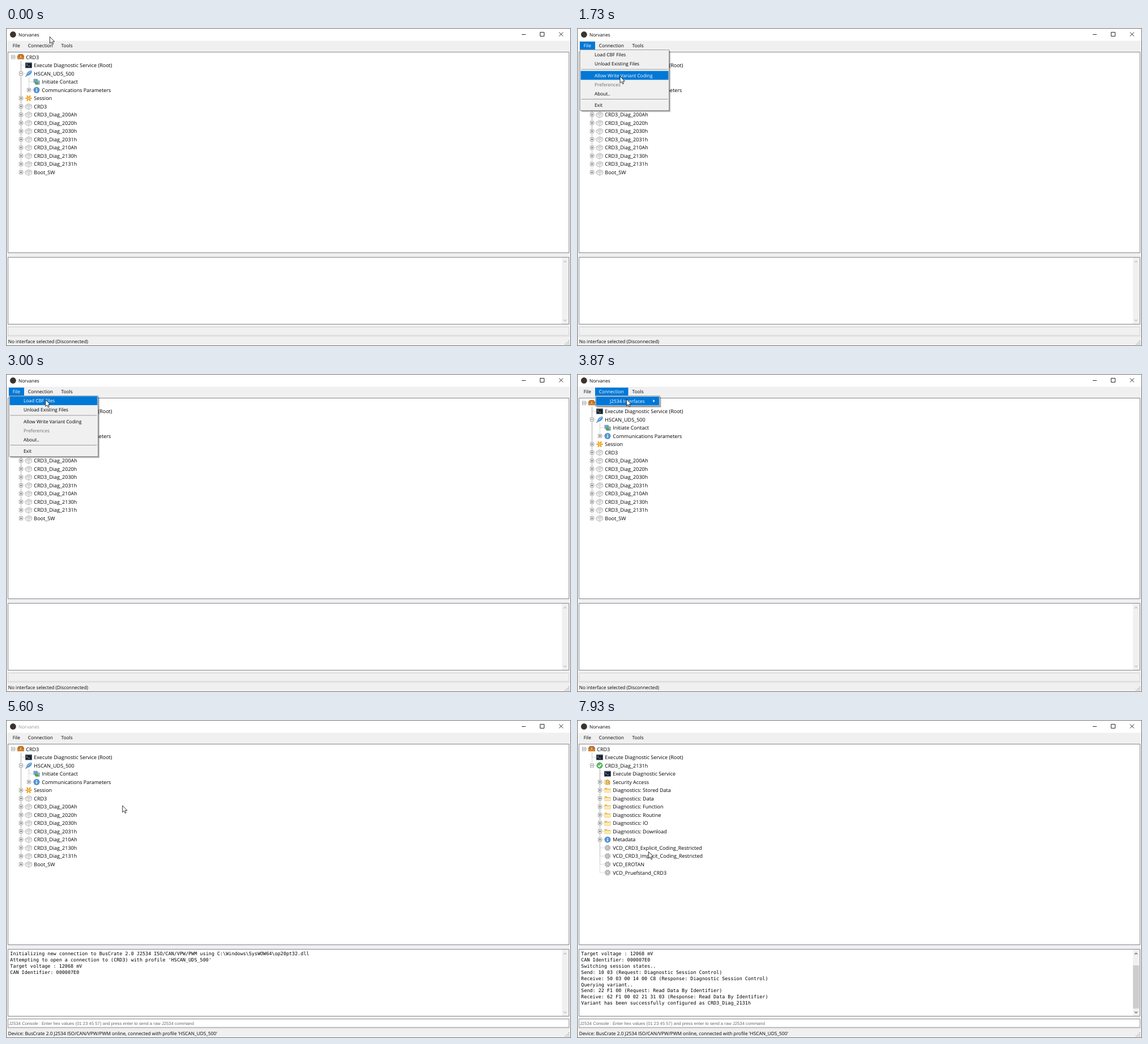
Write an HTML page that moves like this. It is 998x561 px and loops after 8000 ms.

```html
<!DOCTYPE html>
<html lang="en">
<head>
<meta charset="utf-8">
<title>Diagnostics</title>
<style>
  html, body { margin: 0; width: 100%; height: 100%; overflow: hidden; background: #f0f0f0; }
  svg { display: block; width: 998px; height: 561px; text-rendering: geometricPrecision; }
  text { font: 8.3px "Open Sans", "Noto Sans", sans-serif; fill: #000; white-space: pre; }
  text.tree { font-size: 9px; }
  text.log { font: 8.45px "DejaVu Sans Mono", monospace; }
  text.hint { font: 7.72px "Liberation Sans", sans-serif; fill: #6d6d6d; }
  text.off { fill: #6d6d6d; }
  .sel { fill: #0078d7; visibility: hidden; }
  .on > .sel { visibility: visible; }
  .on > text:not(.off) { fill: #fff; }
  .on > .arrow { fill: #fff; }
</style>
</head>
<body>
<svg id="stage" viewBox="0 0 998 561">
  <defs>
    <g id="chest"><path d="M-6-2l2-3H4l2 3v6H-6z" fill="#cf8136"/><path d="M-6-1.5H6M-3.5-4.5H3.5" stroke="#965419" stroke-width=".9"/><path d="M-1-2h2v2.500h-2z" fill="#f4d27a"/></g>
    <g id="term"><path d="M-6-5H6V5H-6z" fill="#5c6b7a"/><path d="M-5.300-3.500H5.300V4.300H-5.300z" fill="#17222d"/><path d="M-4-2l2 1.500-2 1.500M-1 1.500h3" fill="none" stroke="#dfe8ee" stroke-width=".7"/></g>
    <g id="plug"><path d="M-5.500 5.500l3-3" stroke="#5d7894" stroke-width="1.500"/><path d="M-4 2Q-3-3 3-5l2.500 0V-2Q3 3-2 4z" fill="#4c93d4"/><path d="M-2 1L4-4" stroke="#a8d1f2" stroke-width="1.200"/></g>
    <g id="contact"><path d="M-5.500-5H2V2H-5.500z" fill="#8b9aa6"/><path d="M-4.500-4H1V1H-4.500z" fill="#69a8df"/><path d="M-2-2H5.500V5H-2z" fill="#718491"/><path d="M-1-1H4.500V4H-1z" fill="#8ec5f0"/><path d="M-3 1h3V-1l4 3.500-4 3V4h-3z" fill="#49a83d"/></g>
    <g id="info"><circle r="5.400" fill="#3d7fc1"/><circle r="4.400" fill="#5b9ad6"/><path d="M0-3v1.500M0-.5V3" stroke="#fff" stroke-width="1.500"/></g>
    <g id="star"><path d="M-5.500 0H5.500M-3-4.700L3 4.700M3-4.700L-3 4.700" stroke="#f0a024" stroke-width="2.400"/><circle r="1.500" fill="#fbd27c"/></g>
    <g id="cube"><path d="M-5.500-2L0-5 5.500-2.500V2.500L0 5.500-5.500 3z" fill="#ececec" stroke="#a6a6a6" stroke-width=".7"/><path d="M-5.500-2L0 .5 5.500-2.500M0 .5V5.500M-2.700-3.500L3-1M2.700-3.700L-2.700-.8" fill="none" stroke="#b4b4b4" stroke-width=".6"/></g>
    <g id="check"><circle r="5.400" fill="#3fa648"/><circle r="4.300" fill="#5fc066"/><path d="M-2.500 0L-.6 2 2.700-2" fill="none" stroke="#fff" stroke-width="1.500"/></g>
    <g id="folder"><path d="M-5.500-4h4l1 1.500h6v7h-11z" fill="#e9bb58"/><path d="M-5-1H5V4H-5z" fill="#fdeab2"/></g>
    <g id="lock"><path d="M-5.500-4h4l1 1.500h5.500v7h-11z" fill="#f3d68b"/><path d="M-2 0V-2Q0-5 2.500-2V0" fill="none" stroke="#888" stroke-width="1.200"/><path d="M-3 0H4V5H-3z" fill="#e3a62f"/><path d="M-2 1l4 3" stroke="#fff3c8"/></g>
    <g id="gear"><circle r="4.300" fill="#c2c2c2" stroke="#aaa" stroke-width="2" stroke-dasharray="2 1.380"/><circle r="1.500" fill="#f4f4f4" stroke="#999" stroke-width=".6"/></g>
  </defs>

  <path d="M0 0H998V561H0z" fill="#f0f0f0"/>
  <path d="M0 0H998V22.500H0z" fill="#fff"/>
  <circle cx="12.400" cy="11.500" r="5.400" fill="#3b342e"/>
  <text id="caption" x="22" y="14.600" style="font-size:8.200px">Norvanes</text>
  <path d="M911 11.500h7M943.500 7.500h7v7h-7zM977 7.500l7 7M984 7.500l-7 7" fill="none" stroke="#111" stroke-width=".9"/>

  <g fill="#fff" stroke="#828790">
    <path d="M3.500 42.500H994.500V396.500H3.500zM3.500 404.500H994.500V522.500H3.500z"/>
    <path id="input" d="M3.500 527.500H994.500V542.300H3.500z" stroke-width=".8"/>
  </g>
  <path d="M982 405H994V522H982z" fill="#f0f0f0"/>
  <path id="thumb" d="M982 433H993V509H982z" fill="#cdcdcd"/>
  <path id="arrows" d="M985 413.500l2.500-2.500 2.500 2.500M985 514.500l2.500 2.500 2.500-2.500" fill="none" stroke-width="1.100"/>
  <text id="hint" class="hint" x="5" y="537.700">J2534 Console : Enter hex values (01 23 45 57) and press enter to send a raw J2534 command</text>
  <path d="M1 543.900H997" stroke="#d9d9d9" stroke-width=".8"/>
  <text id="status" x="3.700" y="556"></text>
  <path d="M994 551v8M991 554v5M988 557v2" stroke="#a5a5a5" stroke-width="1.600" stroke-dasharray="1.600 1.400"/>
  <path d="M.5.500H997.500V560.500H.5z" fill="none" stroke="#707070"/>

  <g id="content"></g>
  <path id="pointer" d="M0 0V11.800L2.700 9.300 4.600 13.500 6.500 12.700 4.700 8.600H8.300z" fill="#fff" stroke="#000" stroke-width=".8"/>
</svg>
<script>
const LOOP = 8000, DEVICE = 'BusCrate 2.0 J2534 ISO/CAN/VPW/PWM', PROFILE = "'HSCAN_UDS_500'";
const $ = id => document.getElementById(id);

function add(parent, tag, attrs = {}, label) {
  const el = document.createElementNS('http://www.w3.org/2000/svg', tag);
  for (const key in attrs) el.setAttribute(key, attrs[key]);
  if (label) el.textContent = label;
  return parent.appendChild(el);
}
const box = (parent, x, y, width, height, attrs) => add(parent, 'rect', { x, y, width, height, ...attrs });
const show = (el, visible) => { el.style.display = visible ? '' : 'none'; };
const content = $('content');

// Tree rows: level, expander, icon, label
function buildTree(rows) {
  const g = add(content, 'g'), parents = [];
  const places = rows.map(([level], i) => ({ x: 12.5 + 14 * level, y: 51.2 + 14.53 * i }));
  rows.forEach(([level], i) => {
    const { x, y } = places[i];
    parents[level] = y;
    const stem = level ? `M${x} ${parents[level - 1] + 7}V${y}` : '';
    add(g, 'path', { d: `${stem}M${x} ${y}h8`, fill: 'none', stroke: '#a6a6a6', 'stroke-width': .8, 'stroke-dasharray': '1 1' });
  });
  g.rows = rows.map(([, sign, icon, label], i) => {
    const { x, y } = places[i], row = add(g, 'g');
    if (sign) {
      box(row, x - 3, y - 3, 6, 6, { fill: '#fff', stroke: '#919191', 'stroke-width': .8 });
      add(row, 'path', { d: `M${x - 1.8} ${y}h3.600` + (sign === '+' ? `M${x} ${y - 1.8}v3.600` : ''), stroke: '#333', 'stroke-width': .8 });
    }
    add(row, 'use', { href: '#' + icon, x: x + 13.5, y });
    const mark = box(row, x + 21.5, y - 7.2, 0, 14.4, { class: 'sel' });
    const text = add(row, 'text', { class: 'tree', x: x + 22.8, y: y + 3.4 }, label);
    mark.setAttribute('width', text.getComputedTextLength() + 3);
    return row;
  });
  return g;
}

const modules = ['CRD3', ...['200A', '2020', '2030', '2031', '210A', '2130', '2131'].map(n => `CRD3_Diag_${n}h`), 'Boot_SW'];
const rootRow = [0, '-', 'chest', 'CRD3'];
const serviceRow = [1, '', 'term', 'Execute Diagnostic Service (Root)'];
const baseTree = buildTree([
  rootRow, serviceRow,
  [1, '-', 'plug', 'HSCAN_UDS_500'],
  [2, '', 'contact', 'Initiate Contact'],
  [2, '+', 'info', 'Communications Parameters'],
  [1, '+', 'star', 'Session'],
  ...modules.map(name => [1, '+', 'cube', name])
]);
const closedTree = buildTree([[0, '+', 'chest', 'CRD3']]);
closedTree.rows[0].classList.add('on');
const variantTree = buildTree([
  rootRow, serviceRow,
  [1, '-', 'check', 'CRD3_Diag_2131h'],
  [2, '', 'term', 'Execute Diagnostic Service'],
  [2, '+', 'lock', 'Security Access'],
  ...['Stored Data', 'Data', 'Function', 'Routine', 'IO', 'Download'].map(name => [2, '+', 'folder', 'Diagnostics: ' + name]),
  [2, '+', 'info', 'Metadata'],
  ...['CRD3_Explicit_Coding_Restricted', 'CRD3_Implicit_Coding_Restricted', 'EROTAN', 'Pruefstand_CRD3'].map(name => [2, '', 'gear', 'VCD_' + name])
]);

const [fileHead, linkHead] = [['File', 5, 27, 11.7], ['Connection', 32, 58.5, 38.7], ['Tools', 91, 30, 97.5]].map(([label, x, w, textX]) => {
  const g = add(content, 'g');
  box(g, x, 24, w, 14.5, { class: 'sel' });
  add(g, 'text', { x: textX, y: 34 }, label);
  return g;
});

// Menu items: centre line, label, extra class
function buildMenu(x, right, bottom, items, rules = []) {
  const g = add(content, 'g'), w = right - x;
  box(g, x + 3, 41.5, w, bottom - 38.5, { fill: '#000', opacity: .16 });
  box(g, x + 1.5, 40, w, bottom - 38.5, { fill: '#000', opacity: .35 });
  box(g, x, 38.5, w, bottom - 38.5, { fill: '#f0f0f0', stroke: '#a0a0a0' });
  for (const y of rules) add(g, 'path', { d: `M${x + 2} ${y}H${right - 2}`, stroke: '#919191', 'stroke-width': .9 });
  g.items = items.map(([y, label, cls = '']) => {
    const item = add(g, 'g');
    item.y = y;
    box(item, x + 1, y - 7.7, w - 2, 15.6, { class: 'sel' });
    add(item, 'text', { x: x + 25.5, y: y + 3, class: cls }, label);
    return item;
  });
  return g;
}
const fileMenu = buildMenu(5.5, 162.5, 145.5, [
  [47, 'Load CBF Files'], [63, 'Unload Existing Files'], [83.5, 'Allow Write Variant Coding'],
  [99.5, 'Preferences', 'off'], [115.5, 'About..'], [135.5, 'Exit']
], [73, 125.5]);
const linkMenu = buildMenu(32.5, 146, 56.5, [[47.5, 'J2534 Interfaces']]);
add(linkMenu.items[0], 'path', { d: 'M134.500 45l3 2.500-3 2.500z', class: 'arrow' });
const deviceMenu = buildMenu(144.5, 356, 89.5, [[48, 'Virtual Interface'], [64, 'Simulation Interface'], [80, DEVICE]]);

function hover(menu, y) {
  for (const item of menu.items) item.classList.toggle('on', Math.abs(y - item.y) < 8);
}

const messages = [
  `Initializing new connection to ${DEVICE} using C:\\Windows\\SysWOW64\\op20pt32.dll`,
  `Attempting to open a connection to (CRD3) with profile ${PROFILE}`,
  'Target voltage : 12068 mV',
  'CAN Identifier: 000007E0',
  'Switching session states..',
  'Send: 10 03 (Request: Diagnostic Session Control)',
  'Receive: 50 03 00 14 00 C8 (Response: Diagnostic Session Control)',
  'Querying variant..',
  'Send: 22 F1 00 (Request: Read Data By Identifier)',
  'Receive: 62 F1 00 02 21 31 03 (Response: Read Data By Identifier)',
  'Variant has been successfully configured as CRD3_Diag_2131h'
];
const logLines = messages.map(() => add(content, 'text', { class: 'log', x: 7.3 }));
const logSteps = [[0, 0], [4800, 1], [5530, 4], [7470, 8], [7600, 11]];

const path = [
  [0, 77, 15], [200, 15, 45], [400, 15, 45], [670, 22, 31], [800, 22, 31], [870, 46, 51],
  [1070, 72, 75], [1670, 72, 75], [1930, 88, 118], [2000, 88, 118], [2130, 91, 94],
  [2530, 88, 78], [2670, 88, 78], [3130, 62, 32], [3530, 85, 35], [3870, 87, 44],
  [4000, 87, 44], [4270, 150, 47], [4530, 180, 82], [4670, 180, 82], [4730, 180, 85],
  [5130, 92, 94], [5400, 92, 94], [6270, 585, 340], [6330, 539, 328], [6470, 539, 328],
  [6530, 531, 329], [6730, 175, 268], [7000, 175, 268], [7330, 120, 227], [7800, 120, 227],
  [7930, 126, 232], [8000, 126, 232]
];
function pointerAt(t) {
  const i = Math.max(1, path.findIndex(p => p[0] >= t));
  const [t0, x0, y0] = path[i - 1], [t1, x1, y1] = path[i];
  const k = (t - t0) / (t1 - t0);
  return [x0 + (x1 - x0) * k, y0 + (y1 - y0) * k];
}

function render(t) {
  const during = (from, to) => t >= from && t < to;
  const [x, y] = pointerAt(t);
  $('pointer').setAttribute('transform', `translate(${x + .4} ${y + .4})`);

  show(fileMenu, during(530, 3130));
  show(linkMenu, during(3130, 4730));
  show(deviceMenu, during(3930, 4730));
  fileHead.classList.toggle('on', during(470, 3130));
  linkHead.classList.toggle('on', during(3130, 4730));
  hover(fileMenu, y);
  hover(linkMenu, t >= 3930 ? 47.5 : y);
  hover(deviceMenu, x > 145 ? y : 0);

  show(baseTree, t < 7330);
  show(closedTree, during(7330, 7600));
  show(variantTree, t >= 7600);
  baseTree.rows[0].classList.toggle('on', during(4730, 5270));
  baseTree.rows[3].classList.toggle('on', during(5270, 5530));

  const count = logSteps.filter(s => s[0] <= t).pop()[1];
  const first = Math.max(0, count - 9);
  logLines.forEach((line, i) => {
    line.textContent = i < count - first ? messages[first + i] : '';
    line.setAttribute('y', 415 + 10.9 * i);
  });
  show($('thumb'), first > 0);
  $('arrows').setAttribute('stroke', first ? '#606060' : '#bfbfbf');

  const connected = t >= 5530;
  show($('hint'), connected);
  $('input').setAttribute('fill', connected ? '#fff' : '#f0f0f0');
  $('input').setAttribute('stroke', connected ? '#7a7a7a' : '#cccccc');
  $('caption').style.fill = during(5530, 6530) ? '#999' : '#000';
  $('status').textContent = t < 4730 ? 'No interface selected (Disconnected)'
    : `Device: ${DEVICE} online, ` + (connected ? `connected with profile ${PROFILE}` : 'disconnected');
}

// The screen refreshes fifteen times a second, on times rounded to 10 ms.
const start = performance.now();
function tick(now) {
  const t = Math.max(0, now - start) % LOOP;
  const step = Math.floor((t + 5) * .015);
  render(Math.min(Math.round(step * 20 / 3) * 10, LOOP - 10));
  requestAnimationFrame(tick);
}
tick(start);
</script>
</body>
</html>
```
